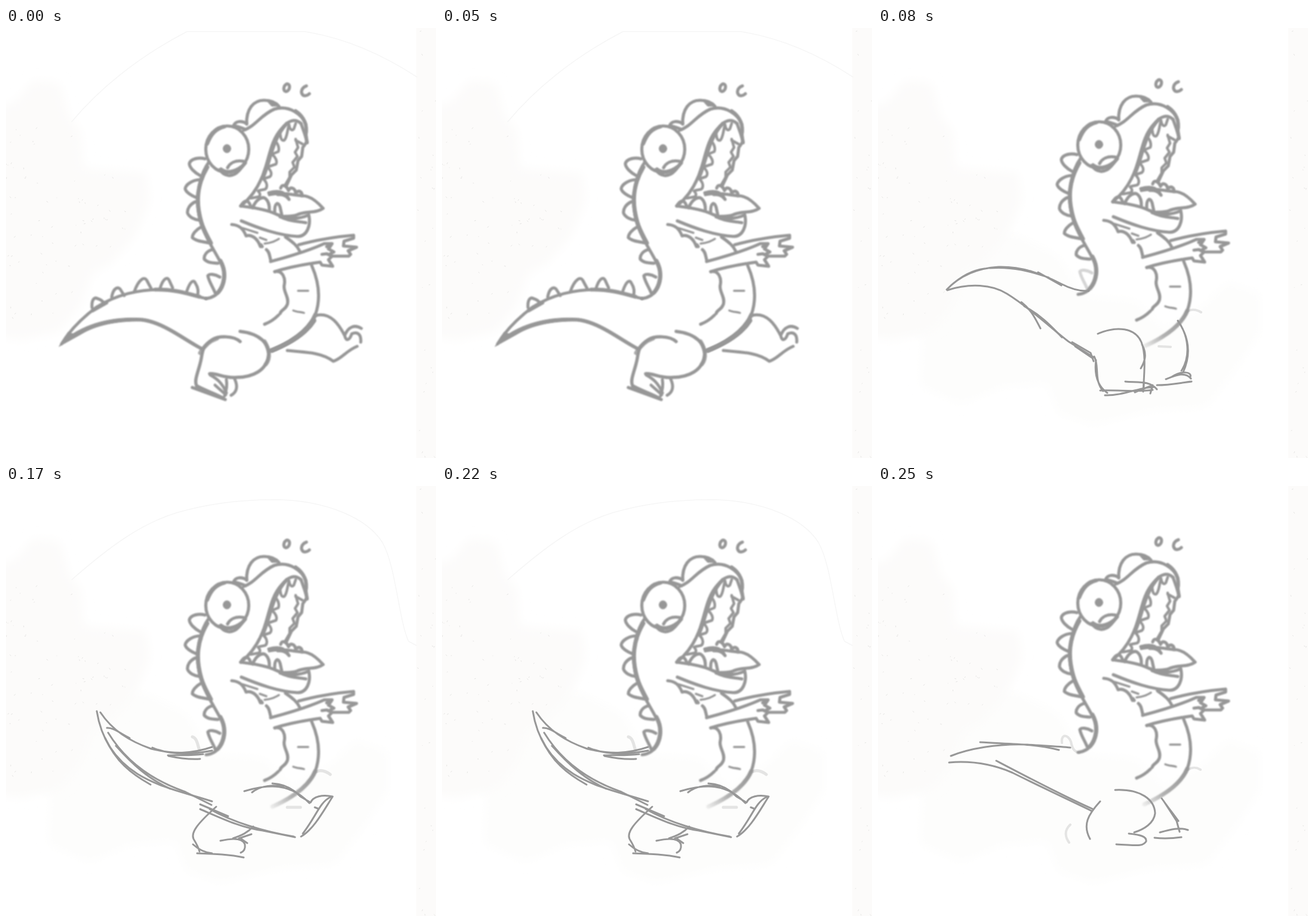
Animation of 720 by 720 pixels, one loop 330 ms. Source, as an HTML page:

```html
<!DOCTYPE html>
<html lang="en">
<head>
<meta charset="utf-8">
<title>Running dinosaur sketch</title>
<style>
  html, body { margin: 0; width: 100%; height: 100%; overflow: hidden; background: #fff; }
  svg { display: block; width: 100vw; height: 100vh; }
  path, ellipse { fill: none; stroke: #979797; stroke-linecap: round; stroke-linejoin: round; }
  .bold { stroke-width: 7; }
  .solid { fill: #979797; stroke-width: 1; }
  .faint { opacity: .25; }
  .arc { stroke: #f6f6f6; stroke-width: 1.5; }
  .paper path { fill: #fcfbfa; stroke: none; }
  .paper .light { fill: #fdfdfc; }
  #specks path { fill: none; stroke: #b9b9b5; stroke-width: .8; }
  .pose { visibility: hidden; }
</style>
</head>
<body>
<svg viewBox="0 0 720 720">
  <defs>
    <filter id="feather" x="-10%" y="-10%" width="120%" height="120%"><feGaussianBlur stdDeviation="9"/></filter>
    <filter id="soft"><feGaussianBlur stdDeviation=".8"/></filter>
    <linearGradient id="fade" gradientUnits="userSpaceOnUse" x1="518" y1="480" x2="443" y2="540">
      <stop offset="0" stop-color="#979797"/><stop offset=".6" stop-color="#979797" stop-opacity=".75"/>
      <stop offset="1" stop-color="#979797" stop-opacity=".15"/>
    </linearGradient>
  </defs>

  <g class="paper">
    <path id="erased" class="light" filter="url(#feather)" d="M0 340L230 345 300 380 345 450 430 455 480 505 545 465 585 425 640 445 640 510 600 570 550 635 460 640 360 665 300 645 285 595 210 600 140 630 70 600 75 510 0 510Z"/>
    <path filter="url(#feather)" d="M-30 135L15 125 45 88 90 92 105 150 125 170 130 235 235 243 240 290 215 350 175 395 145 410 125 465 90 508 25 522-30 515Z"/>
    <path d="M687 0H720V720H687Z"/>
    <g id="specks"></g>
  </g>

  <g id="body" stroke-width="5.2" filter="url(#soft)">
    <!-- sweat drops -->
    <ellipse cx="470" cy="100" rx="4.5" ry="6.5" transform="rotate(20 470 100)"/>
    <path d="M503 97C495 100 492 108 498 113 502 114 506 112 508 110"/>
    <!-- eyes -->
    <path d="M403 161C402 136 414 121 432 121 445 121 453 126 457 131"/>
    <path class="solid" d="M437 122C446 121 453 126 458 131L445 131Z"/>
    <path d="M381 164C384 155 395 155 403 160M381 164C389 164 394 167 401 170"/>
    <ellipse cx="370.500" cy="203" rx="36" ry="39"/>
    <path d="M337 194C344 176 352 169 366 165" stroke-width="6"/>
    <ellipse class="solid" cx="370" cy="202" rx="6.500" ry="7"/>
    <path d="M358 237C365 249 379 251 390 239L401 226M360 236C369 244 383 240 394 232M371 234C375 226 384 221 397 223"/>
    <!-- snout and open mouth -->
    <path d="M398 171C417 165 426 146 449 136 475 128 496 146 502 161"/>
    <path stroke-width="6" d="M485 139C500 149 505 164 502 179L504 192"/>
    <path d="M494 160C483 150 471 156 461 169 445 187 442 210 435 232 428 256 416 280 393 298"/>
    <path d="M470 160C445 187 443 222 431 249" stroke-width="6"/>
    <path stroke-width="4.500" d="M459 172C459 183 461 190 466 188 471 183 471 170 474 162M474 162C475 170 479 173 482 169L485 160M450 189C456 193 458 202 456 207L446 211M445 211C451 216 455 223 452 228L440 232M438 233C444 239 446 245 442 249L433 252M431 253C438 259 438 267 434 270L424 272M422 273C427 278 426 282 421 283L410 285"/>
    <path d="M494 160L500 177 504 190 497 200 495 215 489 222 486 238 478 246 469 265"/>
    <path stroke-width="4.500" d="M485 186L489 200 484 208 488 215 480 225 483 233 475 241 475 250 468 262M485 188L496 194"/>
    <path d="M440 276C461 270 468 277 474 287M441 279C460 274 482 280 497 281 510 281 523 293 531 302 519 311 500 306 487 313 476 317 467 314 459 316"/>
    <path d="M460 268C463 259 471 266 473 272 477 264 484 269 485 276 491 270 496 275 496 281M455 279C463 278 470 281 473 286"/>
    <path d="M393 298C398 290 405 284 410 299M413 301C419 286 430 281 435 286 441 292 441 299 441 304M450 310C449 292 456 290 459 300L462 314"/>
    <path d="M393 298C413 301 435 303 453 312 474 321 492 320 507 313 511 331 504 349 488 349 456 347 425 336 394 323"/>
    <path d="M459 316C476 325 493 324 502 326"/>
    <!-- back and spikes -->
    <path d="M340 224C323 247 316 288 325 322 333 353 358 385 365 405 370 431 355 451 335 453"/>
    <path class="bold" d="M337 233C320 262 317 291 327 325 331 339 338 350 343 360M359 390C371 411 364 433 355 443"/>
    <path d="M333 219C323 216 309 219 307 227 307 234 317 243 325 247M323 254C312 255 301 262 300 269 301 275 311 281 319 284M317 291C308 295 303 303 304 310 307 317 316 321 324 322M327 333C318 338 312 345 312 351 318 357 331 358 341 360M346 371C336 373 331 381 332 387 338 394 348 393 355 394"/>
    <path id="lastSpike" d="M358 417C350 412 340 411 338 415 340 425 346 433 350 443"/>
    <!-- chest -->
    <path d="M378 329C391 330 397 336 402 348 411 345 421 352 426 366M429 366L427 363M436 371C441 375 441 380 443 388M468 350C481 359 488 365 492 374"/>
    <path stroke-width="3.500" d="M396 335L421 343M425 351L436 355M433 361C445 360 450 357 457 353"/>
    <!-- arms -->
    <path d="M443 391C477 382 509 372 533 361L546 361 540 370 549 375 543 378M450 408C478 399 505 395 526 392L529 397 547 399 540 388 546 382 537 378 529 379"/>
    <path d="M490 363C519 355 548 350 582 347L582 352 566 357 565 365 587 367 573 373 577 379 574 382 548 382M545 362L537 366"/>
    <!-- belly -->
    <path d="M512 398C526 430 526 457 518 480M450 408C464 405 468 420 466 430 463 441 475 450 471 463 467 473 461 471 459 478M456 481C449 488 441 493 433 496"/>
    <path stroke-width="3.500" d="M489 440H506M481 473C487 476 494 475 499 477"/>
    <path id="bellyEnd" class="bold" d="M518 480C509 502 484 523 446 540"/>
  </g>

  <g class="pose" stroke-width="5">
    <path class="arc" d="M110 157C155 103 220 49 303 6H500C563 16 628 43 688 82"/>
    <g filter="url(#soft)">
      <path d="M93 529C106 507 127 486 152 467 184 447 223 437 262 438 291 438 315 449 335 453"/>
      <path stroke-width="6.500" d="M145 473L168 460M250 438C278 437 302 444 324 450"/>
      <path class="solid" d="M89 533L104 509 112 512C145 491 187 483 229 486 263 490 298 518 329 535L328 540C293 522 262 495 226 491 183 490 148 499 127 512Z"/>
      <path d="M144 468C143 455 148 450 153 453 160 455 163 458 165 462M177 450C180 435 187 433 191 437L198 448M215 441C222 421 232 415 236 423L244 438M258 436C263 419 270 416 273 422L279 435M303 440C308 425 314 420 317 427 322 435 322 440 321 447"/>
      <path class="bold" d="M441 541C475 529 502 512 516 490"/>
      <path stroke-width="5.500" d="M392 508C427 512 440 530 440 545 438 574 412 585 386 585 365 587 352 577 341 579M392 525C381 515 356 515 345 522 325 535 330 546 325 562 321 578 315 590 319 599 335 608 348 611 364 620M312 602L367 622"/>
      <path class="bold" d="M325 544C333 531 341 524 353 520M435 563C444 552 440 537 433 525" stroke-opacity=".8"/>
      <path d="M342 581C353 587 362 594 369 611M350 598L368 614M369 589C371 600 368 610 366 616M383 588C389 601 386 610 377 615"/>
      <path d="M520 481C544 476 558 497 567 515 573 500 584 496 595 503M567 515C570 527 576 521 579 512 590 507 595 515 594 526M471 540C505 543 530 544 548 558 562 554 570 540 588 533"/>
    </g>
  </g>

  <g class="pose" stroke-width="3">
    <path d="M115 438C136 416 166 402 202 400 242 399 275 412 306 428 325 438 340 441 353 440M120 433C142 413 161 405 178 403M187 402C225 399 257 408 286 418M268 409L307 431M116 439C153 427 191 429 216 445 255 469 290 503 319 525L362 552"/>
    <path d="M240 459C258 473 264 488 272 503M245 466C270 479 288 497 308 518M325 526L356 544 361 558M330 533L358 552"/>
    <path d="M368 512C400 498 431 502 441 526 449 546 446 575 444 609M442 530C451 546 447 558 440 570M362 550C371 565 361 590 377 608M365 556C362 580 367 599 384 611"/>
    <path d="M372 607C405 606 432 610 460 606M380 615C410 616 440 601 463 601M414 592C435 594 455 590 467 605M445 593V604M430 610L460 598 456 612"/>
    <path d="M502 490C520 515 524 549 508 574M504 493C524 524 522 552 511 576"/>
    <path d="M482 588C500 581 514 575 524 587M492 584C509 573 526 576 523 584M467 598C490 598 506 594 525 592"/>
    <path class="faint" stroke-width="4" d="M516 475C525 470 533 471 541 476M470 533L490 534"/>
  </g>

  <g class="pose" stroke-width="3">
    <path class="arc" d="M110 157C176 99 227 63 285 45 342 28 402 22 460 23 541 26 605 55 630 94 653 134 657 222 674 260L687 267"/>
    <path d="M152 377C160 428 187 461 220 482 259 506 302 514 345 528M158 379C178 409 206 427 243 440 280 449 310 449 345 437M169 405C179 404 191 414 207 422M245 438C270 449 303 451 345 443M271 451C290 450 305 452 330 449M272 452C290 456 308 458 325 457"/>
    <path d="M171 413C196 454 237 490 300 512L344 534M184 435C211 465 237 490 275 507M166 422C184 461 208 481 242 500"/>
    <path d="M325 533L372 553M325 541C360 556 395 573 430 577L484 588M341 541C380 563 433 579 482 587"/>
    <path d="M399 511C440 499 476 497 508 531M412 513C428 500 449 501 465 503M446 498C467 499 481 507 493 520L510 530C514 520 530 516 547 520 531 545 515 575 494 587M543 521C525 530 520 552 497 582M517 538L522 540"/>
    <path d="M352 537C321 565 309 580 314 591 319 599 322 604 324 612M313 600C325 611 335 614 345 615M320 615C350 616 375 617 398 622M359 594C377 590 396 589 400 600 401 607 398 612 393 614M380 590C395 585 405 580 414 570M390 590L411 583M394 591L404 598"/>
    <path class="faint" stroke-width="5" d="M312 420C320 422 321 434 324 443M518 479C527 474 535 477 543 483M471 538H493"/>
  </g>

  <g class="pose" stroke-width="3">
    <path d="M122 452C151 440 200 431 250 433 280 435 305 436 322 438M171 429C220 432 260 431 303 442M119 463C153 460 190 465 225 480 265 500 320 526 358 544M198 460C257 491 310 519 360 541"/>
    <path d="M372 528C352 550 342 567 355 591M397 509C440 507 463 525 464 548 462 565 445 575 429 580M420 582C440 584 450 587 449 595 443 605 430 601 399 600"/>
    <path d="M475 523C485 537 495 550 503 561M478 527L500 561 505 579M472 580C490 575 505 571 519 576M463 589C480 591 494 590 508 588"/>
    <path class="faint" stroke-width="4" d="M308 430C306 415 318 415 323 428 325 438 327 444 337 447M519 475C527 470 533 471 540 475M322 567C310 578 315 590 320 597"/>
  </g>
</svg>
<script>
  const byId = id => document.getElementById(id);
  const poses = [...document.querySelectorAll('.pose')];
  const steps = [
    { until: 80, lift: 0, spike: 1 },
    { until: 170, lift: 7, spike: .4 },
    { until: 250, lift: 3, spike: 1 },
    { until: 330, lift: 7, spike: 1 }
  ];

  // Sparse paper fibres
  let seed = 17;
  const random = () => (seed = seed * 16807 % 2147483647) / 2147483647;
  function addFibres(count, x, y, width, height) {
    let d = '';
    for (let i = 0; i < count; i++) {
      d += `M${x + random() * width} ${y + random() * height}l${random() * 4 - 2} ${random() * 4 - 2}`;
    }
    const fibre = document.createElementNS('http://www.w3.org/2000/svg', 'path');
    fibre.setAttribute('d', d);
    fibre.setAttribute('opacity', .45);
    byId('specks').append(fibre);
  }
  addFibres(45, 0, 145, 110, 350);
  addFibres(25, 110, 245, 90, 130);
  addFibres(25, 688, 0, 32, 720);

  function draw(now) {
    const time = now % 330;
    const index = steps.findIndex(step => time < step.until);
    const { lift, spike } = steps[index];
    poses.forEach((pose, i) => pose.style.visibility = i === index ? 'visible' : 'hidden');
    byId('body').setAttribute('transform', `translate(0 ${-lift})`);
    byId('lastSpike').setAttribute('opacity', spike);
    byId('bellyEnd').style.stroke = index ? 'url(#fade)' : '#979797';
    byId('erased').style.visibility = index ? 'visible' : 'hidden';
  }

  let start;
  function tick(now) {
    start ??= now;
    draw(now - start);
    requestAnimationFrame(tick);
  }
  draw(0);
  requestAnimationFrame(tick);
</script>
</body>
</html>
```
